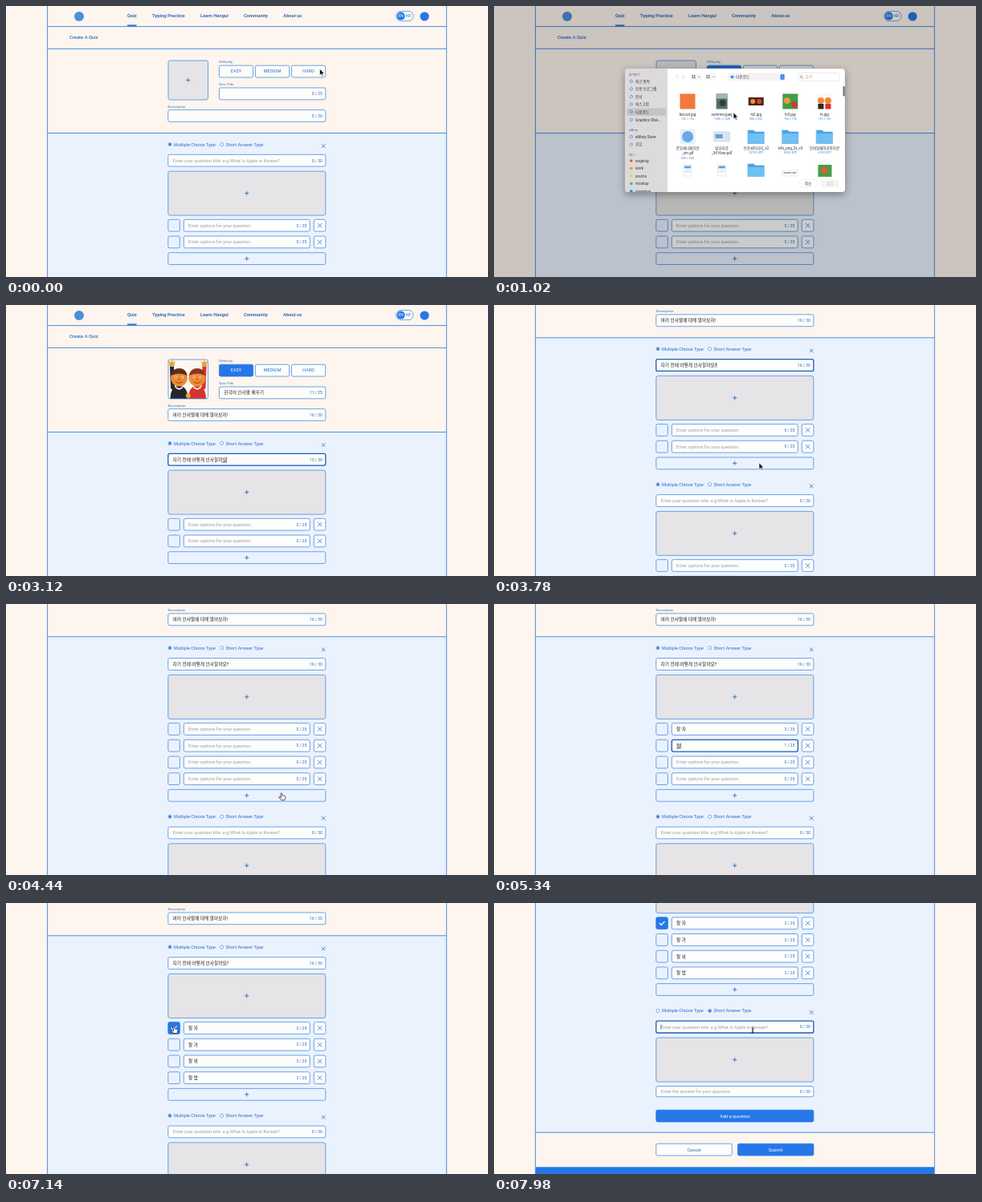
These frames come from a looping animation (600x338 px, 8000 ms). An HTML page:

```html
<!DOCTYPE html>
<html lang="ko">
<head>
<meta charset="utf-8">
<title>Create A Quiz</title>
<style>
  html, body { margin: 0; width: 100%; height: 100%; overflow: hidden; background: #fdf5ee; }
  svg { display: block; width: 100vw; height: 100vh; }
  text { font-family: Roboto, "Noto Sans CJK KR", "Noto Sans CJK", sans-serif; white-space: pre; }
</style>
</head>
<body>
<svg id="stage" viewBox="0 0 600 338"></svg>
<script>
const stage = document.getElementById('stage');
const LOOP = 8000;
const BLUE = '#2577e8', LINE = '#4a8fdc', INK = '#2a6cc0', DARK = '#1c5cb0',
      PALE = '#eaf2fe', CREAM = '#fdf5ee', PAPER = '#fdfdfc', GREY = '#e6e4e6';

// ---------- drawing helpers ----------
const text = (x, y, s, size = 5.65, fill = INK, attrs = '') =>
  `<text x="${x}" y="${y}" font-size="${size}" fill="${fill}" ${attrs}>${s}</text>`;
const MID = 'text-anchor="middle"', END = 'text-anchor="end"', BOLD = 'font-weight="600"';
const rect = (x, y, w, h, fill, stroke = 'none', r = 0, sw = .8) =>
  `<rect x="${x}" y="${y}" width="${w}" height="${h}" rx="${r}" fill="${fill}" stroke="${stroke}" stroke-width="${sw}"/>`;
const circle = (x, y, r, fill, stroke = 'none', sw = .7) =>
  `<circle cx="${x}" cy="${y}" r="${r}" fill="${fill}" stroke="${stroke}" stroke-width="${sw}"/>`;
const path = (d, stroke, sw = .8, fill = 'none') =>
  `<path d="${d}" fill="${fill}" stroke="${stroke}" stroke-width="${sw}" stroke-linecap="round" stroke-linejoin="round"/>`;
const plus = (x, y) => path(`M${x - 2.2} ${y}h4.4M${x} ${y - 2.2}v4.4`, INK, .9);
const cross = (x, y, r) => path(`M${x - r} ${y - r}l${2 * r} ${2 * r}m0 ${-2 * r}l${-2 * r} ${2 * r}`, INK, .8);
const bar = (x, cy, w, fill = PAPER, stroke = LINE, sw = .8) => rect(x, cy - 7.4, w, 14.8, fill, stroke, 2, sw);

// ---------- Korean typing ----------
const CHO = 'ㄱㄲㄴㄷㄸㄹㅁㅂㅃㅅㅆㅇㅈㅉㅊㅋㅌㅍㅎ';
const isHangul = c => /[ㄱ-ㅎ가-힣]/.test(c);

// Every state of the field while the syllables are being composed.
function strokes(s) {
  const out = [''];
  let done = '';
  for (const c of s) {
    const k = c.charCodeAt(0) - 0xAC00;
    if (k >= 0 && k < 11172) {
      out.push(done + CHO[Math.floor(k / 588)], done + String.fromCharCode(0xAC00 + k - k % 28));
      if (k % 28) out.push(done + c);
    } else out.push(done + c);
    done += c;
  }
  return out;
}
const field = (states, start, step, on, off) => ({ states, start, step, on, off });

const title = field(strokes('한국어 인사말 배우기'), 1400, 19, 1385, 1890);
const about = field(strokes('여러 인사말에 대해 알아보자!'), 1910, 19, 1890, 2505);
const ask = field(strokes('자기 전에 어떻게 인사할까요?'), 2520, 19, 2505, 3900);
const ask2 = field([''], 0, 1, 7800, LOOP);
const blank = field([''], 0, 1, LOOP, LOOP);
const answers = [
  field(strokes('잘 자'), 4680, 55, 4590, 5130),
  field(strokes('잘 가'), 5160, 60, 5130, 5900),
  field(strokes('잘 와'), 5920, 40, 5900, 6190),
  // a slip, a pause, then the correction
  field(['', 'ㅈ', '자', '잘', '잛', '잘', '잘 ', '잘 ㅂ', '잘 바', '잘 밤'], 6190, 25, 6185, 7050)
];
answers[3].warp = t => t < 6540 ? Math.min(t, 6300) : t - 240;

function input(x, cy, w, f, t, max, hint = '', counterSize = 5) {
  const time = f.warp ? f.warp(t) : t;
  const i = Math.floor((time - f.start) / f.step);
  const s = f.states[Math.max(0, Math.min(f.states.length - 1, i))];
  const focus = t >= f.on && t < f.off;
  const last = s.slice(-1), left = x + 5.8, size = 5.7;
  let out = bar(x, cy, w, PAPER, focus ? DARK : LINE, focus ? 1.3 : .8);
  if (s) {
    const shown = focus && isHangul(last)
      ? `${s.slice(0, -1)}<tspan text-decoration="underline">${last}</tspan>` : s;
    out += text(left, cy + 2, shown, size, '#222');
  } else out += text(left, cy + 2, hint, 5.65, '#9a9da3');
  if (focus) {
    let wide = 0;
    for (const c of s) wide += size * (isHangul(c) ? .92 : c === ' ' ? .23 : .4);
    out += path(`M${left + wide + .2} ${cy - 2.8}v5.6`, '#222', .5);
  }
  return out + text(x + w - 4, cy + 1.8, `${s.length} / ${max}`, counterSize, INK, END);
}

// ---------- page ----------
function picture() {
  const kid = (x, coat, hair, side) => {
    const hx = x + side * 6;
    return path(`M${x + side * 8} 103L${hx + side * 3} 77`, coat, 5)
      + circle(hx + side * 3, 74, 3.2, '#f0a03c')
      + path(`M${hx + side * 3} 72v-3m2 4l1.5 -2.5m-5.5 2.5l-1.5 -2.5`, '#f0a03c', 1.3)
      + path(`M${x - 11} 118q0 -17 11 -17t11 17z`, 'none', 0, coat)
      + circle(x, 91, 10.5, '#ee8a35')
      + path(`M${x - 10.3} 88q2 -9 10.3 -9t10.3 9q-10 -5 -20.6 0z`, 'none', 0, hair)
      + circle(x - 4, 90, 1.4, '#fff') + circle(x + 4, 90, 1.4, '#fff')
      + circle(x - 4, 90, .7, '#222') + circle(x + 4, 90, .7, '#222')
      + circle(x, 93, 1.4, '#d9632a') + path(`M${x - 4} 96q4 3 8 0`, '#7a2c14', .8)
      + path(`M${x - 4} 103l4 2l4 -2`, '#fff', 1.5);
  };
  return `<clipPath id="pic"><rect x="202" y="68" width="49.5" height="49" rx="2"/></clipPath><g clip-path="url(#pic)">`
    + rect(202, 68, 49.5, 49, '#fbf8f2') + kid(215.5, '#26262b', '#5c2d1c', -1) + kid(238, '#d8322a', '#8c3320', 1)
    + circle(226.8, 113, 3, '#f0a03c') + '</g>' + rect(202, 68, 49.5, 49, 'none', LINE, 2.5);
}

function header() {
  const nav = [[151, 'Quiz'], [182, 'Typing Practice'], [242, 'Learn Hangul'], [296, 'Community'], [345, 'About us']];
  return circle(91, 13, 6, LINE)
    + nav.map(([x, s]) => text(x, 13.6, s, 5.8, INK, BOLD)).join('')
    + rect(151, 23.4, 11.5, 2.4, BLUE)
    + rect(485.5, 6.6, 21.5, 12, PAPER, LINE, 6) + circle(491.6, 12.6, 5, BLUE)
    + text(491.6, 14.4, 'EN', 4.8, '#fff', MID) + text(501, 14.4, 'KR', 4.8, INK, MID)
    + circle(521, 13, 5.6, BLUE)
    + path('M52 25.6H548M52 53.4H548', LINE, 1)
    + text(79, 41.4, 'Create A Quiz', 5.85, INK, 'font-weight="500"');
}

function form(t) {
  const levels = ['EASY', 'MEDIUM', 'HARD'].map((s, i) => {
    const x = 265.4 + 45 * i, on = i === 0 && t >= 270;
    return bar(x, 81.6, 42.2, on ? BLUE : PAPER, on ? BLUE : LINE)
      + text(x + 21.1, 83.4, s, 5.5, on ? '#fff' : INK, MID);
  }).join('');
  return (t < 1260 ? rect(202, 68, 49.5, 49, GREY, LINE, 2.5) + plus(226.8, 92.4) : picture())
    + text(265.3, 71.4, 'Difficulty', 4.3) + levels
    + text(265.3, 99, 'Quiz Title', 4.3) + input(265.4, 109.4, 132.4, title, t, 25)
    + text(201.5, 126.6, 'Description', 4.3) + input(201.8, 137, 196, about, t, 30);
}

function radio(x, y, on, s) {
  return circle(x, y, 2.1, PAPER, LINE) + (on ? circle(x, y, 1.5, BLUE) : '') + text(x + 5, y + 2, s, 5.6);
}

function question(y, t, q, opts, short, checked) {
  let out = radio(204, y, !short, 'Multiple Choice Type') + radio(268.6, y, short, 'Short Answer Type')
    + cross(395.2, y + 2.1, 2)
    + input(201.8, y + 20.2, 196, q, t, 30, 'Enter your question title. e.g What is Apple in Korean?')
    + rect(201.8, y + 33.6, 196, 55, GREY, LINE, 2.5) + plus(299.7, y + 61);
  if (short) return out + bar(201.8, y + 100.7, 196, PAPER, LINE).replace('14.8', '13.2')
    .replace(`y="${y + 93.3}"`, `y="${y + 94.1}"`)
    + text(207.6, y + 102.6, 'Enter the answer for your question.', 5.65, '#9a9da3')
    + text(393.8, y + 102.6, '0 / 30', 5, INK, END);
  const rowY = i => y + 101.2 + 20.7 * i;
  opts.forEach((f, i) => {
    const cy = rowY(i), on = checked && i === 0;
    out += bar(201.8, cy, 14.6, on ? BLUE : PALE, on ? BLUE : LINE)
      + (on ? path(`M206 ${cy}l2.2 2.3l4 -4.4`, '#fff', 1.2) : '')
      + input(221.3, cy, 157, f, t, 25, 'Enter options for your question.', 4.9)
      + bar(383.3, cy, 14.6) + cross(390.6, cy, 2.4);
  });
  const end = rowY(opts.length);
  return out + bar(201.8, end, 196, PALE) + plus(299.7, end);
}

function page(t) {
  const count = 2 + (t >= 3960) + (t >= 4300), short = t >= 7520;
  const y1 = 172.5, y2 = y1 + 127.6 + 20.7 * count;
  const add = y2 + (short ? 131.2 : 173), foot = add + 20.6;
  return header() + form(t)
    + rect(52, 158.5, 496, foot - 158.5, PALE) + path(`M52 158.5H548M52 ${foot}H548`, LINE, 1)
    + question(y1, t, ask, answers.slice(0, count), false, t >= 7080)
    + question(y2, t, ask2, [blank, blank], short, false)
    + bar(201.8, add, 196, BLUE, BLUE) + text(299.8, add + 2, 'Add a question', 5.65, '#fff', MID)
    + bar(201.8, add + 42, 94.5) + text(249, add + 44, 'Cancel', 5.65, INK, MID)
    + bar(303.4, add + 42, 94.5, BLUE, BLUE) + text(350.6, add + 44, 'Submit', 5.65, '#fff', MID)
    + rect(52, add + 63.7, 496, 90, BLUE);
}

// ---------- file dialog ----------
const folder = (x, y) => path(`M${x - 10} ${y - 8}h7l2 2h11v14.500h-20z`, '#4ba3e3', .5, '#4ba3e3')
  + rect(x - 10, y - 4, 20, 12, '#6fc0f3', 'none', 1);
const sheet = (x, y) => rect(x - 5, y - 7, 10, 14, '#fff', '#c8ccd2', .5, .5) + rect(x - 4, y - 5.5, 8, 3, '#5aa3e0')
  + path(`M${x - 3} ${y}h6m-6 2h6`, '#aab', .5);
const thumbs = [
  (x, y) => rect(x - 9.500, y - 9.5, 19, 19, '#f1793a'),
  (x, y) => rect(x - 7, y - 9.5, 14, 19, '#56705f') + rect(x - 7, y - 9.5, 14, 6, '#9fb7b5') + circle(x + 1, y + 2, 4, '#2f3f36'),
  (x, y) => rect(x - 9.500, y - 5, 19, 10, '#4a2417') + circle(x - 4, y, 3, '#e9913a') + circle(x + 4, y, 3, '#d8432d'),
  (x, y) => rect(x - 9.500, y - 9.5, 19, 19, '#3f9d49') + circle(x - 4, y - 1, 4, '#ee9a3c') + circle(x + 5, y + 4, 4, '#d63a2b'),
  (x, y) => rect(x - 9.500, y - 9.5, 19, 19, '#fbf8f2') + circle(x - 4.5, y - 1, 4, '#ee8a35') + circle(x + 4.5, y - 1, 4, '#ee8a35')
    + rect(x - 8, y + 3, 7, 6.5, '#26262b') + rect(x + 1, y + 3, 7, 6.5, '#d8322a'),
  (x, y) => rect(x - 9.500, y - 9.5, 19, 19, '#e4f0fc') + circle(x, y, 7, '#68a9e6'),
  (x, y) => rect(x - 10, y - 6, 20, 12, '#d9e6f4', '#bbc', 0, .4) + rect(x - 8, y - 3, 9, 5, '#6b9ccc'),
  folder, folder, folder, sheet, sheet, folder,
  (x, y) => rect(x - 10, y, 20, 7, '#fff', '#ccc', 0, .4) + path(`M${x - 8} ${y + 3}h9m2 0h4`, '#556', 1),
  (x, y) => rect(x - 8, y - 7, 17, 15, '#43a047') + circle(x, y, 4, '#e25b36')
];
const labels = [
  ['biscuit.jpg', '736 × 736'], ['summer.jpeg', '1,080 × 1,440'], ['hi2.jpg', '800 × 282'],
  ['hi3.jpg', '736 × 736'], ['hi.jpg', '736 × 736'],
  ['로딩애니메이션', '_sm.gif', '600 × 600'], ['발표자료', '_0416ver.pdf'], ['브로셔이미지_v2', '10개의 항목'],
  ['info_png_2x_v3', '8개의 항목'], ['모바일페이지아이콘', '6개의 항목']
];

function dialog(t) {
  const side = [[94, '최근 항목'], [103.5, '응용 프로그램'], [113, '문서'], [122.5, '데스크탑'], [132, '다운로드'],
    [142, 'Graphics Shel...'], [163, 'eMisty Store'], [172.5, '공유']];
  const tags = [[193, 'ongoing', '#f0503c'], [202.5, 'work', '#f59a23'], [212, 'source', '#f5cc2c'],
    [221.5, 'mockup', '#45bd55'], [231, 'operation', '#3a80f0']];
  const small = (x, y, s) => text(x, y, s, 3.7, '#8b898b', BOLD);
  let out = rect(0, 0, 600, 338, 'rgba(0,0,0,.2)')
    + `<g style="filter:drop-shadow(0 3px 5px rgba(0,0,0,.35))">${rect(163, 78, 274, 154, '#fff', '#aaa', 4, .4)}</g>`
    + '<clipPath id="dlg"><rect x="163" y="78" width="274" height="154" rx="4"/></clipPath><g clip-path="url(#dlg)">'
    + rect(163, 78, 53, 154, '#dcdadb') + rect(165, 127.4, 49, 9.4, '#c5c3c5', 'none', 2)
    + small(168, 87, '즐겨찾기') + small(168, 156, 'eMisty') + small(168, 186.5, '태그');
  for (const [y, s] of side)
    out += circle(170.8, y, 1.7, 'none', '#3483e8') + text(176, y + 1.6, s, 4.6, '#333');
  for (const [y, s, c] of tags) out += circle(170.8, y, 1.8, c) + text(176, y + 1.6, s, 4.6, '#333');

  // toolbar
  out += path('M228.800 86.500l-1.500 2l1.500 2M235 86.500l1.500 2l-1.500 2', '#bbb', .6);
  for (const x of [245, 263]) {
    out += rect(x, 84, 14, 9, '#f7f7f7', 'none', 2);
    for (let i = 0; i < 4; i++) out += rect(x + 1.5 + i % 2 * 2.4, 86.3 + (i >> 1) * 2.4, 1.6, 1.6, '#666');
    out += path(`M${x + 9.5} 88l1 1l1 -1`, '#666', .6);
  }
  out += rect(291, 83.500, 72, 10, '#f3f3f4', 'none', 2.5) + circle(296.5, 88.5, 2.1, '#3a9be8')
    + text(301, 90.2, '다운로드', 4.7, '#333') + rect(356.500, 85.3, 5, 6.5, BLUE, 'none', 1.3)
    + path('M358 87.800l1 -1l1 1m0 1.500l-1 1l-1 -1', '#fff', .6)
    + rect(378.5, 83.5, 52, 10, '#fff', '#ddd', 2.5, .6) + circle(382.6, 88.2, 1.4, 'none', '#777', .6)
    + path('M383.700 89.300l1.200 1.200', '#777', .6) + text(387.500, 90.2, '검색', 4.5, '#aaa')
    + rect(434.4, 100, 2.4, 12.5, '#777', 'none', 1);

  // files
  thumbs.forEach((draw, i) => {
    const x = 241 + 42.6 * (i % 5), row = Math.floor(i / 5);
    if (t >= 1140 && i === 4) out += rect(x - 12, 107, 24, 24, '#dcdcde', 'none', 2) + rect(x - 9, 131.800, 18, 6, BLUE, 'none', 1.5);
    out += draw(x, [119, 163, 205][row]);
    const lines = labels[i] || [];
    lines.forEach((s, n) => {
      const sub = n === lines.length - 1 && i !== 6;
      const white = t >= 1140 && i === 4 && !sub;
      out += text(x, [136.5, 178.8][row] + n * (sub && n === 1 ? 5.3 : 6.3), s, sub ? 3.6 : 4.5,
        white ? '#fff' : sub ? '#3a86dc' : '#333', MID);
    });
  });
  return out + rect(216, 213, 221, 19, '#fff')
    + rect(380, 216.500, 22, 9.500, '#fff', '#e4e4e4', 2, .5) + text(391, 223, '취소', 4.7, '#333', MID)
    + rect(407, 216.500, 22, 9.500, t < 1140 ? '#f5f5f5' : BLUE, 'none', 2)
    + text(418, 223, '열기', 4.7, t < 1140 ? '#bbb' : '#fff', MID) + '</g>';
}

// ---------- motion ----------
const ease = p => p * p * (3 - 2 * p);
const ramp = (t, a, b) => ease(Math.max(0, Math.min(1, (t - a) / (b - a))));
const scroll = t => 117.7 * ramp(t, 3480, 3780) + 130.8 * ramp(t, 7140, 7400);

// time, x, y, pointer used from then on
const moves = [
  [0, 390.5, 78.5, 'arrow'], [60, 390.5, 78.5, 'arrow'], [230, 290, 82, 'hand'], [300, 290, 82, 'hand'],
  [480, 229, 94, 'hand'], [580, 229, 94, 'arrow'], [860, 262, 118, 'arrow'], [1020, 298, 133, 'arrow'],
  [1120, 411, 121, 'arrow'], [1160, 411, 121, 'arrow'], [1230, 418, 221, 'arrow'], [1270, 410, 200, 'arrow'],
  [1370, 305, 110, 'beam'], [1400, 305, 110, ''], [3420, 330, 190, 'arrow'], [3800, 330, 197, 'hand'],
  [4000, 335, 199, 'hand'], [4260, 340, 219, 'hand'], [4320, 340, 219, 'hand'], [4420, 343, 239, 'hand'],
  [4460, 343, 239, 'hand'], [4570, 300, 156, 'beam'], [4660, 300, 156, ''], [6970, 260, 190, 'arrow'],
  [7060, 209, 157, 'hand'], [7140, 209, 157, 'hand'], [7380, 230, 146, 'arrow'], [7490, 269, 134.500, 'hand'],
  [7560, 269, 134.5, 'hand'], [7740, 322, 159, 'beam'], [8000, 322, 159, 'beam']
];
const pointers = {
  arrow: path('M0 0v8l1.900 -1.700l1.300 2.800l1.300 -.6l-1.300 -2.700h2.500z', '#fff', .6, '#111'),
  hand: path('M-1 -2.800q1 -1.200 1.600 0l.5 2.800q3 -.4 3.800 1.300l-.3 2.700l-1 1.500h-4l-3 -3.500q.2 -1.200 1.600 -.3l1.200 .8z', '#111', .7, '#fff'),
  beam: path('M-1.300 -3.300q1.300 0 1.300 .8v5q0 .8 1.300 .8m-2.600 0q1.300 0 1.300 -.8v-5q0 -.8 1.300 -.8', '#111', .7)
};

function pointer(t) {
  let i = 0;
  while (i < moves.length - 2 && moves[i + 1][0] <= t) i++;
  const [ta, xa, ya, kind] = moves[i], [tb, xb, yb] = moves[i + 1];
  if (!kind) return '';
  const p = ramp(t, ta, tb);
  return `<g transform="translate(${xa + (xb - xa) * p} ${ya + (yb - ya) * p})">${pointers[kind]}</g>`;
}

function render(t) {
  stage.innerHTML = rect(0, 0, 600, 338, CREAM)
    + `<g transform="translate(0 ${-scroll(t)})">${page(t)}</g>`
    + path('M51.600 0V338M548.300 0V338', LINE, 1)
    + (t >= 580 && t < 1250 ? dialog(t) : '')
    + pointer(t);
}

const begin = performance.now();
function tick() {
  render((performance.now() - begin) % LOOP);
  requestAnimationFrame(tick);
}
tick();
</script>
</body>
</html>
```
